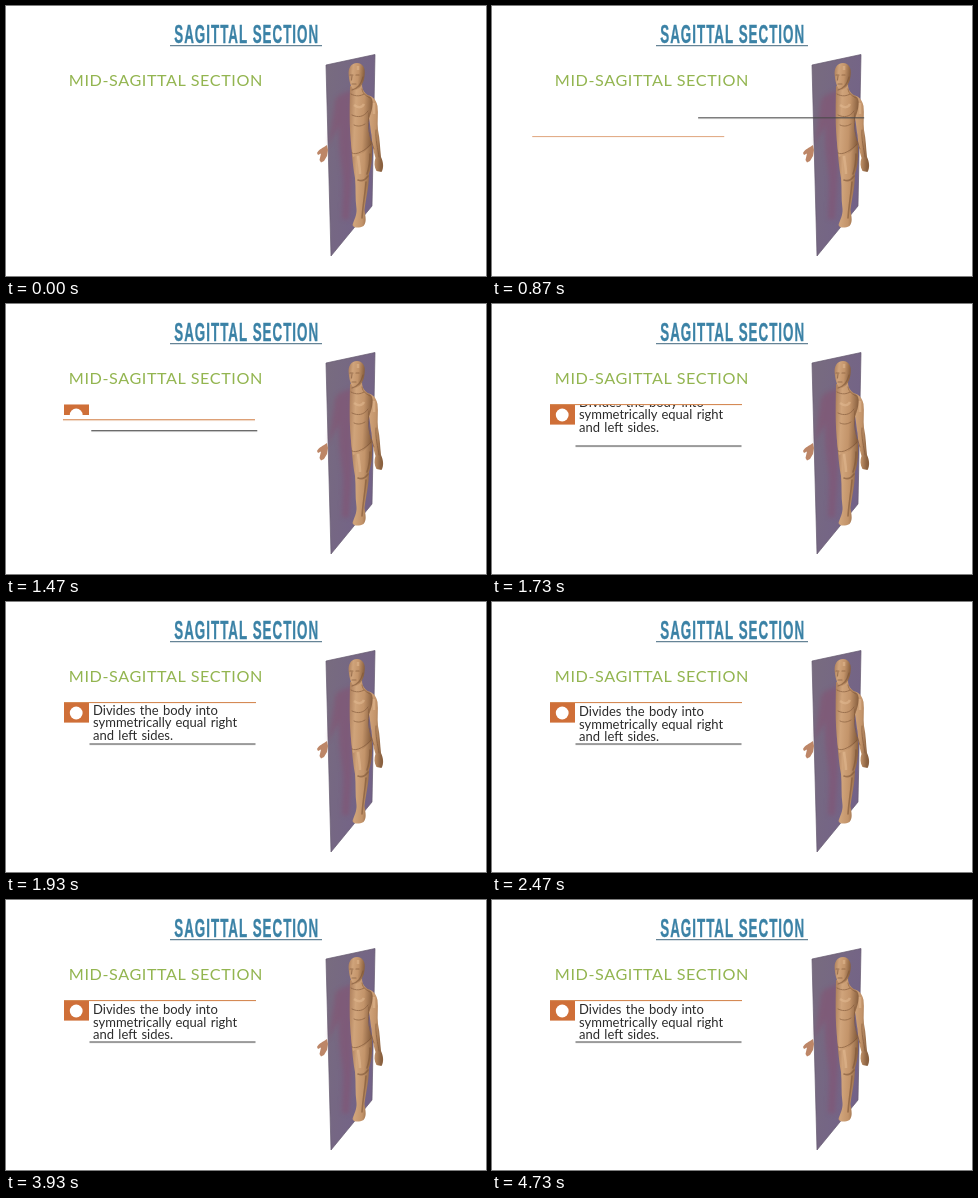
These frames come from a looping animation (480x270 px, 4.94 s). An HTML page:

```html
<!DOCTYPE html>
<html lang="en">
<head>
<meta charset="utf-8">
<title>Sagittal section</title>
<style>
  html, body { margin: 0; width: 100%; height: 100%; overflow: hidden; background: #fff; }
  svg { display: block; width: 100vw; height: 100vh; }
  .title {
    font: bold 25.5px "Liberation Sans", Arial, sans-serif;
    letter-spacing: 1.9px;
    fill: #3b82a6; stroke: #3b82a6; stroke-width: .4;
    transform: translate(240.7px, 36.8px) scaleX(.525);
    text-anchor: middle;
  }
  .subtitle { font: 16.2px Lato, sans-serif; letter-spacing: .58px; fill: #93b550; }
  .body { font: 13px Lato, sans-serif; word-spacing: 1px; fill: #2b2b2b; }
</style>
</head>
<body>
<svg viewBox="0 0 480 270" xmlns="http://www.w3.org/2000/svg">
  <defs>
    <linearGradient id="plane" x1="0" y1="0" x2="1" y2=".6">
      <stop offset="0" stop-color="#786c7f"/>
      <stop offset="1" stop-color="#736288"/>
    </linearGradient>
    <linearGradient id="skin" x1="0" x2="1" y1="0" y2=".15">
      <stop offset="0" stop-color="#ab7d5a"/>
      <stop offset=".3" stop-color="#d0a47b"/>
      <stop offset=".65" stop-color="#c3946a"/>
      <stop offset="1" stop-color="#8a6140"/>
    </linearGradient>
    <clipPath id="textArea"><rect x="84" y="101" width="180" height="41"/></clipPath>
    <filter id="soft" x="-50%" y="-50%" width="200%" height="200%"><feGaussianBlur stdDeviation=".7"/></filter>
    <filter id="haze" x="-50%" y="-50%" width="200%" height="200%"><feGaussianBlur stdDeviation="2"/></filter>
  </defs>

  <text class="title">SAGITTAL SECTION</text>
  <path d="M164 39.7H316" stroke="#668496" stroke-width="1.2"/>
  <text class="subtitle" x="62.8" y="79.8">MID-SAGITTAL SECTION</text>

  <!-- cutting plane with the far half of the figure behind it -->
  <path d="M320 59L369 48.500L366 200L325 250Z" fill="url(#plane)" stroke="#65596f" stroke-width=".7"/>
  <path d="M346 84C338 88 330 88 329 96L325 123L322 140L333 120C332 152 338 165 337 180L336 213L343 214L346 168Z"
        fill="#86506f" opacity=".5" filter="url(#haze)"/>
  <path d="M321 139C317 142 313 143 311 147L312 149L315 147.500L313.500 154L315 156.500L318 155L321 150L322 144Z" fill="#bd8667"/>

  <!-- near half of the figure -->
  <g fill="url(#skin)">
    <path d="M358 89C365 89 370 92 371.500 100C372.500 108 371 116 372 124C374 133 374 143 375 151C377.500 156 378 162 375.500 166L370.500 165C368 161 368 156 369.500 152C367 144 366 137 365.500 129C364 121 364 112 361 106Z"/>
    <path d="M345 136L365.500 135C367 148 366 160 363 168C363 181 360 192 358.500 204C359.500 211 361 216 357.500 220C353 222.500 347 222 346.500 219C348 214 351 209 350.500 203C349 192 350 183 349 172C347 161 346 150 345 136Z"/>
    <path d="M344 80L356 78C356 85 359 87.500 365 91C369 96 365 107 363 113C361 122 363 129 366 138L357 147L347 151C343 128 343.500 108 344 80Z"/>
    <path d="M342.700 69C342 62 345 57 351 57C357 57 359.800 62.500 358.500 70C358 76 355 82 350 84C345.500 83.500 343.500 78 342.700 69Z"/>
  </g>
  <g fill="none" stroke="#7d5537" stroke-linecap="round" opacity=".6" filter="url(#soft)">
    <path d="M346 109C352 112 358 111 362 105M356 83C357 89 361 90 364 92"/>
    <path d="M363 107C361 120 364 132 368 143M346 147C350 150 360 144 365 138"/>
    <path d="M352 174C357 176 360 173 362 170M360 176C359 189 357 198 356 212M364 148C364 155 363 162 361 168" stroke-width="1.600"/>
    <path d="M344 69H347M350 69H353M346 70L345.500 74M346 78H350M357 71C355 79 352 82 346 84" stroke-width="1.200"/>
    <path d="M370 124C369 133 372 143 373 151M348 119C352 121 356 120 359 118M345 88C350 91 355 90 358 88"/>
  </g>
  <path d="M352 60V64M348 99C352 102 356 102 358 98M352 150C353 158 354 162 354 168M368 97V108"
        fill="none" stroke="#e5bd95" stroke-width="2.500" opacity=".5" filter="url(#soft)"/>

  <!-- definition panel -->
  <g id="badge">
    <rect x="58" y="100.300" width="25" height="20.500" fill="#cf6f38"/>
    <circle cx="70.200" cy="111" r="6.400" fill="#fff"/>
  </g>
  <g clip-path="url(#textArea)">
    <g id="copy" class="body">
      <text x="87" y="114">Divides the body into</text>
      <text x="87" y="126.600">symmetrically equal right</text>
      <text x="87" y="139.200">and left sides.</text>
    </g>
  </g>
  <rect id="topRule" width="192" height="1.100" fill="#d58a55"/>
  <rect id="bottomRule" width="166" height="1.100" fill="#484848"/>
</svg>

<script>
  const LOOP = 4940;
  const OUT = 'cubic-bezier(.22,.61,.36,1)';
  const IN_OUT = 'cubic-bezier(.35,.2,.6,.9)';
  const at = (x, y, opacity = 1) => ({ transform: `translate(${x}px, ${y}px)`, opacity });
  const wipe = bottom => ({ clipPath: `inset(0 0 ${bottom}% 0)` });

  // Each step: time in ms, properties, easing towards the next step.
  function play(id, steps) {
    const frames = steps.map(([time, props, easing = 'linear']) =>
      ({ ...props, easing, offset: time / LOOP }));
    const last = steps[steps.length - 1][1];
    document.getElementById(id).animate(
      [{ ...frames[0], offset: 0 }, ...frames, { ...last, offset: 1 }],
      { duration: LOOP, iterations: Infinity });
  }

  play('topRule', [
    [690, at(4, 130, 0), OUT],
    [1260, at(56, 130), IN_OUT],
    [1730, at(58, 100)]
  ]);
  play('bottomRule', [
    [690, at(480, 111.300), OUT],
    [1260, at(87, 111.300), IN_OUT],
    [1730, at(83.500, 141.500)]
  ]);
  play('badge', [
    [1320, wipe(100)],
    [1610, wipe(0)]
  ]);
  play('copy', [
    [1510, at(0, -52), OUT],
    [2070, at(0, 0)]
  ]);
</script>
</body>
</html>
```
